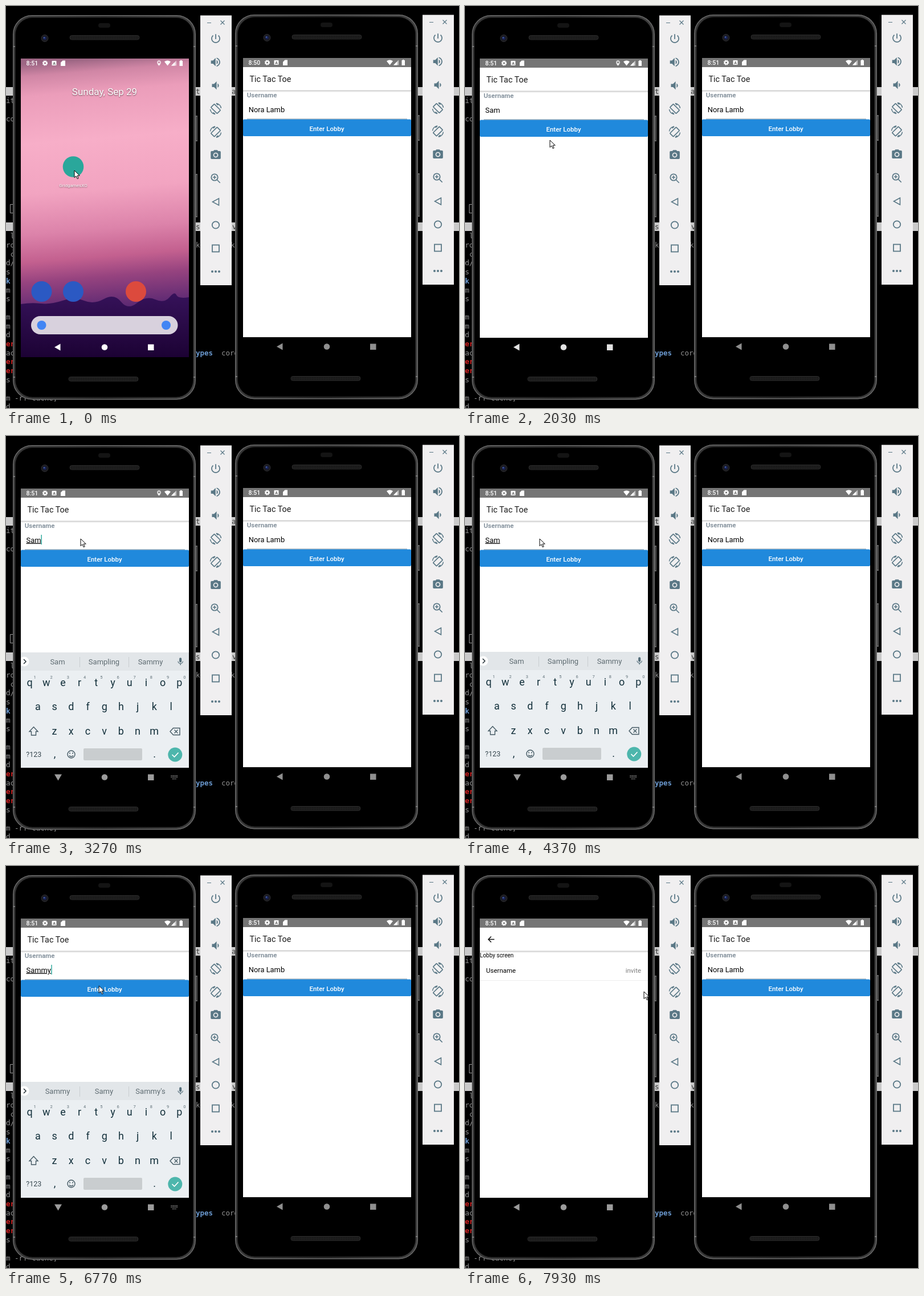
These frames come from a looping animation (795x704 px, 8000 ms). An HTML page:

```html
<!DOCTYPE html>
<html lang="en">
<head>
<meta charset="utf-8">
<title>Two phones</title>
<style>
html, body { margin: 0; width: 100%; height: 100%; overflow: hidden; background: #000; }
svg { display: block; width: 795px; height: 704px; font-family: Roboto, sans-serif; }
.mono { font-family: "DejaVu Sans Mono", monospace; font-size: 12.5px; }
.mid { text-anchor: middle; }
.title { font-size: 14.35px; fill: #1a1a1a; }
.label { font-size: 11.5px; font-weight: 700; fill: #86939e; }
.field { font-size: 12.9px; }
.under { text-decoration: underline; }
.button { font-size: 11.5px; font-weight: 500; fill: #fff; }
.clock { font-size: 10.5px; font-weight: 500; fill: #fff; }
.key { font-size: 18px; fill: #13303b; }
.hint { font-size: 7.5px; fill: #5f6f77; }
.tip { font-size: 13px; fill: #5f6c72; }
.shade { text-shadow: 0 1px 2px rgba(0, 0, 0, .55); }

.move { animation: 8s linear infinite; }
#cursor { animation-name: cursor; }
#keyboard { animation-name: keyboard; }
#nav { animation-name: nav; }
#ripple { animation-name: ripple; transform-origin: 173px 214.5px; }
#lobby { animation-name: lobby; }

@keyframes cursor {
  0%, 25.37% { transform: translate(120px, 288px); }
  25.375%, 25.875% { transform: translate(149px, 235px); }
  32.875%, 81.625% { transform: translate(131px, 180px); }
  85.375%, 94.125% { transform: translate(171px, 217px); }
  96.25%, 97.5% { transform: translate(234px, 224px); }
  99.125%, 100% { transform: translate(314px, 220px); }
}
@keyframes keyboard {
  0%, 38.375% { opacity: 0; transform: translateY(20px); animation-timing-function: ease-out; }
  40.875%, 42.125% { opacity: 1; transform: translateY(1px); }
  43.375%, 94.9% { opacity: 1; transform: none; }
  95.5%, 97.5% { opacity: 1; transform: translateY(1px); }
  98.9%, 100% { opacity: 0; transform: translateY(20px); }
}
@keyframes nav {
  0%, 25.37% { fill: #fff; }
  25.375%, 25.875% { fill: #e2e2e2; }
  32.875%, 100% { fill: #9c9c9c; }
}
@keyframes ripple {
  0%, 94.9% { opacity: 0; transform: scale(.4); }
  95% { opacity: 1; transform: scale(.5); }
  96.25%, 97.5% { opacity: 1; transform: none; }
  100% { opacity: 1; transform: scale(1.7); }
}
@keyframes lobby {
  0%, 97.5% { opacity: 0; transform: translateY(14px); animation-timing-function: ease-out; }
  99.125%, 100% { opacity: 1; transform: none; }
}
</style>
</head>
<body>
<svg viewBox="0 0 795 704">
  <defs>
    <linearGradient id="sky" gradientUnits="userSpaceOnUse" x1="150" y1="92" x2="185" y2="530">
      <stop offset="0" stop-color="#9d6684"/>
      <stop offset=".05" stop-color="#d086a5"/>
      <stop offset=".13" stop-color="#eb9dba"/>
      <stop offset=".32" stop-color="#f7aec8"/>
      <stop offset=".52" stop-color="#f2a4c1"/>
      <stop offset=".68" stop-color="#dc83aa"/>
      <stop offset=".79" stop-color="#c3608f"/>
      <stop offset=".87" stop-color="#96437f"/>
      <stop offset="1" stop-color="#5a2872"/>
    </linearGradient>
    <linearGradient id="hill" x1="0" y1="0" x2="0" y2="1">
      <stop offset="0" stop-color="#36125a"/>
      <stop offset="1" stop-color="#1c0234"/>
    </linearGradient>
    <linearGradient id="rim" x1="0" y1="0" x2="1" y2="0">
      <stop offset="0" stop-color="#383838"/>
      <stop offset=".5" stop-color="#262626"/>
      <stop offset="1" stop-color="#404040"/>
    </linearGradient>
    <pattern id="mesh" width="3" height="3" patternUnits="userSpaceOnUse">
      <rect width="3" height="3" fill="#202020"/>
      <rect width="1.5" height="1.5" fill="#101010"/>
    </pattern>
    <clipPath id="screen"><rect x="26" y="92" width="295" height="489"/></clipPath>
    <clipPath id="press"><rect x="26" y="199.5" width="295" height="29.5" rx="2"/></clipPath>

    <g id="turn" fill="none" stroke="#5a7886" stroke-width="1.7">
      <rect x="-4.2" y="-7.7" width="8.4" height="15.4" rx="1" transform="rotate(-45)"/>
      <path d="M1-9.5A9.5 9.5 0 0 1 9.5-1M-1 9.5A9.5 9.5 0 0 1-9.5 1" stroke-width="1.5"/>
      <path d="M1-9.5l3.5 3M-1 9.5l-3.5-3"/>
    </g>

    <g id="device">
      <rect x="331" y="192" width="5" height="45" fill="#666"/>
      <rect x="331" y="294" width="5" height="76" fill="#666"/>
      <rect x="334" y="194" width="1" height="41" fill="#222"/>
      <rect x="334" y="296" width="1" height="72" fill="#222"/>
      <rect x="12.7" y="16.7" width="319.6" height="672" rx="33" fill="url(#rim)" stroke="#6c6c6c" stroke-width="1.4"/>
      <rect x="16.5" y="20.5" width="312" height="664.5" rx="30" stroke="#161616"/>
      <path d="M12 71h4M329 71h4M12 650h4M329 650h4" stroke="#777" stroke-width="2"/>
      <rect x="162" y="30" width="21" height="8" rx="4" fill="#141414"/>
      <rect x="112" y="51.5" width="122" height="7.5" rx="3.5" fill="url(#mesh)" stroke="#292929"/>
      <rect x="110" y="649.5" width="122" height="7.5" rx="3.5" fill="url(#mesh)" stroke="#292929"/>
      <circle cx="68" cy="56.5" r="6" fill="#1b1b20" stroke="#2e2e32"/>
      <circle cx="68" cy="56.5" r="3" fill="#172050"/>
      <circle cx="67" cy="55.5" r="1.3" fill="#4561a8"/>

      <rect x="341" y="16.5" width="55" height="472.5" fill="#f0eff0"/>
      <g fill="none" stroke="#5a7886" stroke-width="1.8">
        <path d="M353 29.500h7M376.500 25.500l7 7m0-7l-7 7" stroke-width="1.2"/>
        <circle cx="366" cy="300" r="5.700"/>
        <path d="M370.200 304.200l5.500 5.500M363 300h6M366 297v6" stroke-width="1.600"/>
        <path d="M373.500 337v12l-11-6z" stroke-width="1.600"/>
        <circle cx="368" cy="383.500" r="6.200"/>
        <rect x="362" y="418.500" width="12" height="12"/>
      </g>
      <use href="#turn" x="368" y="180"/>
      <use href="#turn" transform="translate(368 220.500) scale(-1 1)"/>
      <g fill="#5a7886">
        <path transform="translate(357.500 46.500) scale(.88)" d="M13 3h-2v10h2V3zm4.830 2.170l-1.420 1.420C17.990 7.860 19 9.810 19 12c0 3.870-3.130 7-7 7s-7-3.130-7-7c0-2.190 1.010-4.140 2.580-5.420L6.170 5.170C4.230 6.820 3 9.260 3 12c0 4.970 4.030 9 9 9s9-4.030 9-9c0-2.740-1.230-5.180-3.170-6.830z"/>
        <path transform="translate(357 87.500) scale(.9)" d="M3 9v6h4l5 5V4L7 9H3zm13.500 3c0-1.770-1.020-3.290-2.500-4.030v8.050c1.480-.73 2.500-2.250 2.500-4.020zM14 3.230v2.060c2.890.86 5 3.540 5 6.710s-2.110 5.850-5 6.710v2.060c4.010-.91 7-4.490 7-8.770s-2.990-7.860-7-8.770z"/>
        <path transform="translate(357 128.500) scale(.9)" d="M18.500 12c0-1.770-1.020-3.290-2.500-4.030v8.050c1.480-.73 2.500-2.250 2.500-4.020zM5 9v6h4l5 5V4L9 9H5z"/>
        <path transform="translate(357.500 250.500) scale(.88)" d="M9 2L7.170 4H4c-1.100 0-2 .9-2 2v12c0 1.100.9 2 2 2h16c1.100 0 2-.9 2-2V6c0-1.100-.9-2-2-2h-3.170L15 2H9zm3 15c-2.760 0-5-2.240-5-5s2.240-5 5-5 5 2.240 5 5-2.240 5-5 5z"/>
        <circle cx="368" cy="261" r="2.700"/>
        <circle cx="362" cy="465" r="2"/><circle cx="368" cy="465" r="2"/><circle cx="374" cy="465" r="2"/>
      </g>
    </g>

    <g id="form">
      <rect x="26" y="92" width="295" height="489" fill="#fff"/>
      <rect x="26" y="92" width="295" height="16" fill="#757575"/>
      <path d="M26 149.500h295" stroke="#cfcfcf" stroke-width="2"/>
      <path d="M26 151.200h295" stroke="#eee"/>
      <text class="title" x="37.500" y="134">Tic Tac Toe</text>
      <text class="label" x="32.800" y="161">Username</text>
      <path d="M33 199h281" stroke="#6f7f8a"/>
      <rect x="26" y="199.500" width="295" height="29.500" rx="2" fill="#2089dc"/>
    </g>
    <text id="enter" class="button mid" x="173" y="219.500">Enter Lobby</text>

    <g id="status" fill="#fff">
      <circle cx="68.500" cy="100" r="2.600" fill="none" stroke="#fff" stroke-width="2"/>
      <circle cx="68.500" cy="100" r="4" fill="none" stroke="#fff" stroke-width="1.300" stroke-dasharray="2 1.140"/>
      <rect x="80.500" y="96" width="8" height="8" rx="1"/>
      <text x="84.500" y="102.700" class="mid" font-size="7" font-weight="700" fill="#666">A</text>
      <path d="M99.500 95.500h4.500v9.500h-8v-6z"/>
      <path d="M278 97.500q5.500-4 11 0l-5.500 7z"/>
      <path d="M299 95.500v9h-9z" opacity=".6"/>
      <path d="M296 98.500v6h-6z"/>
      <path d="M304.500 96h1.500v-1h2.500v1h1.500v9h-5.500z"/>
    </g>
    <g id="dots">
      <circle cx="173" cy="597.500" r="5.300"/>
      <rect x="249" y="592.500" width="10.500" height="10.500"/>
    </g>
    <path id="back" d="M95.500 591.500v12l-10.500-6z"/>
  </defs>

  <rect width="795" height="704"/>
  <g fill="#cacaca">
    <rect y="142" width="795" height="15"/>
    <rect y="379" width="795" height="15"/>
  </g>
  <path d="M12 347.500H7.500v15H12" fill="none" stroke="#999"/>
  <g id="shell" class="mono"></g>

  <use href="#device"/>
  <use href="#device" x="390" y="-1"/>

  <g transform="translate(390 -1)">
    <use href="#form"/>
    <use href="#enter"/>
    <use href="#status"/>
    <text class="field" x="35.800" y="186.500">Nora Lamb</text>
    <text class="clock" x="35.500" y="104" data-on="0 400">8:50</text>
    <text class="clock" x="35.500" y="104" data-on="400">8:51</text>
    <g fill="#8f8f8f"><use href="#back"/><use href="#dots"/></g>
  </g>

  <use href="#form"/>
  <g clip-path="url(#press)"><circle id="ripple" class="move" cx="173" cy="214.500" r="88" fill="#1b72b8"/></g>
  <use href="#enter"/>
  <text class="field" x="35.500" y="186.500" data-on="2030 2970">Sam</text>
  <text class="field under" x="35.500" y="186.500" data-on="2970 5000">Sam</text>
  <text class="field under" x="35.500" y="186.500" data-on="5000 5270">Samm</text>
  <text class="field under" x="35.500" y="186.500" data-on="5270">Sammy</text>
  <g fill="#26a69a">
    <rect x="61.500" y="173" width="1.400" height="17" data-on="2970 3900 4530 5000"/>
    <rect x="73.200" y="173" width="1.400" height="17" data-on="5000 5270"/>
    <rect x="79.300" y="173" width="1.400" height="17" data-on="5270 6170 6730 7300"/>
  </g>

  <g clip-path="url(#screen)">
    <g id="lobby" class="move">
      <rect x="26" y="108" width="295" height="493" fill="#fff"/>
      <path d="M26 149.500h295" stroke="#cfcfcf" stroke-width="2"/>
      <path d="M26 151.200h295M26 200.500h295" stroke="#eee"/>
      <path d="M51.500 128.500H41m5-5l-5 5 5 5" fill="none" stroke="#111" stroke-width="1.500"/>
      <text x="26" y="160" font-size="10">Lobby screen</text>
      <text x="37" y="186.500" font-size="11.500">Username</text>
      <text x="309" y="186.500" font-size="11.500" text-anchor="end" fill="#7d7d7d">invite</text>
    </g>
    <g id="keyboard" class="move">
      <rect x="26" y="378" width="295" height="203" fill="#ebeff2"/>
      <rect x="26" y="378" width="295" height="32" fill="#e2e6e9"/>
      <path d="M129.500 386v18M215.500 386v18" stroke="#c9ced1"/>
      <circle cx="32" cy="394" r="8.500" fill="#fff"/>
      <path d="M31 390l4 4-4 4" fill="none" stroke="#263238" stroke-width="1.500"/>
      <path transform="translate(298 386) scale(.68)" fill="#546e7a" d="M12 14c1.660 0 3-1.340 3-3V5c0-1.660-1.340-3-3-3S9 3.340 9 5v6c0 1.660 1.340 3 3 3zm5.300-3c0 3-2.540 5.100-5.300 5.100S6.700 14 6.700 11H5c0 3.410 2.720 6.230 6 6.720V21h2v-3.280c3.280-.48 6-3.300 6-6.720h-1.700z"/>
      <g class="tip mid">
        <text x="90.500" y="399" data-on="2970 5000">Sam</text>
        <text x="90.500" y="399" data-on="5000 5370">Samm</text>
        <text x="90.500" y="399" data-on="5370">Sammy</text>
        <text x="172" y="399" data-on="2970 5370">Sampling</text>
        <text x="172" y="399" data-on="5370">Samy</text>
        <text x="253.500" y="399" data-on="2970 5370">Sammy</text>
        <text x="253.500" y="399" data-on="5370">Sammy's</text>
      </g>
      <g id="keys" class="mid"></g>
      <g fill="none" stroke="#455a64" stroke-width="1.400">
        <path d="M48.500 508.500l7.500 8h-3.500v6.500h-8v-6.500H41z"/>
        <path d="M293.500 510.500H305v12h-11.500l-5.500-6zM295.500 513.500l6 6m0-6l-6 6"/>
        <circle cx="114.500" cy="556.500" r="6.500"/>
        <path d="M111 558.500q3.500 4 7 0"/>
        <path d="M112 553.500v2M117 553.500v2" stroke-width="1.700"/>
      </g>
      <text class="mid" x="48.800" y="561" font-size="12.500" fill="#37474f">?123</text>
      <text class="key mid" x="85.500" y="562">,</text>
      <text class="key mid" x="260.500" y="562">.</text>
      <rect x="136" y="546" width="103" height="21" rx="2" fill="#c9cdcf"/>
      <circle cx="296.800" cy="557" r="12.500" fill="#4db6ac"/>
      <path d="M291.500 557l4 4 7-7.500" fill="none" stroke="#fff" stroke-width="1.700"/>
    </g>
  </g>

  <g data-on="0 2030">
    <rect x="26" y="92" width="295" height="523" fill="url(#sky)"/>
    <path d="M26 522q18-3 35-1t38-5 38 0 35-3 30 5 28 2 32-6 25-4 12-4 22 4V615H26z" fill="url(#hill)"/>
    <text class="mid shade" x="173" y="156" font-size="17" fill="#fff">Sunday, Sep 29</text>
    <circle cx="118" cy="281.500" r="18.300" fill="#2aa79b"/>
    <text class="mid shade" x="118" y="316.500" font-size="8" fill="#fff">GridgamesXO</text>
    <g fill="#2b59c3"><circle cx="62.500" cy="500" r="18"/><circle cx="118" cy="500" r="18"/></g>
    <circle cx="228" cy="500" r="18" fill="#dc4a3d"/>
    <rect x="44" y="543" width="257.500" height="32" rx="16" fill="#d8d1dd"/>
    <g fill="#4285f4"><circle cx="62.500" cy="559" r="8"/><circle cx="281" cy="559" r="8"/></g>
  </g>

  <use href="#status"/>
  <text class="clock" x="35.500" y="104">8:51</text>
  <path data-on="0 4370" transform="translate(263 94.500) scale(.46)" fill="#fff" d="M12 2C8.130 2 5 5.130 5 9c0 5.250 7 13 7 13s7-7.750 7-13c0-3.870-3.130-7-7-7zm0 11a4 4 0 1 1 0-8 4 4 0 0 1 0 8z"/>
  <g id="nav" class="move">
    <use href="#dots"/>
    <use href="#back" data-on="0 3070 7850"/>
    <g data-on="3070 7850">
      <path d="M85 592.500h13l-6.500 11z"/>
      <path d="M289.500 595h12M289.500 597.500h12M292 600.500h7" fill="none" stroke="#8c8c8c" stroke-width="1.600" stroke-dasharray="1.500 1"/>
    </g>
  </g>
  <path id="cursor" class="move" d="M0 0V12.500L3 9.800 5.200 14.600 7.200 13.700 5.100 9H9.300z" fill="#fff" stroke="#000"/>
</svg>
<script>
const LOOP = 8000;
const find = id => document.getElementById(id);
const text = (x, y, s, attrs = '') => `<text x="${x}" y="${y}" ${attrs}>${s}</text>`;

// Terminal behind the phones: [row centre, text, colour, x]
const GREY = '#929292', BLUE = '#6c9bd2', RED = '#d02020', DARK = '#333';
const lines = [
  [166, 'it'], [198, 'co'], [403, '&#160;l'], [419, 'ro'], [435, '&#160;c'], [450, 'd/'],
  [466, 's'], [482, 'k', BLUE], [498, 'm'], [513, 's'], [545, 'm'], [561, 'm'], [576, 'd'],
  [592, 'er', RED], [608, 'ac'], [623, 'er', RED], [639, 'er', RED], [655, 's'],
  [687, 'm -rf cache,'], [702, 'd'],
  [150, 'to', DARK, 333], [150, 'a', DARK, 396], [387, 's', DARK, 333], [387, 'v', DARK, 397],
  [419, 'k', GREY, 333], [419, 'k', GREY, 394], [608, 'ypes', BLUE, 333], [608, 'cord', GREY, 378]
];
find('shell').innerHTML = lines.map(([y, s, color = GREY, x = 0]) =>
  text(x, y + 4, s, `fill="${color}" font-weight="${color === BLUE || color === RED ? 700 : 400}"`)).join('');

const rows = [['qwertyuiop', 41.5, 437], ['asdfghjkl', 56, 479], ['zxcvbnm', 85, 521.5]];
find('keys').innerHTML = rows.map(([keys, x0, y], row) => [...keys].map((key, i) => {
  const x = x0 + i * 29.2;
  return text(x, y, key, 'class="key"') + (row ? '' : text(x + 9, y - 13.5, (i + 1) % 10, 'class="hint"'));
}).join('')).join('');

// data-on lists the times at which a part turns on, off, on, ...
for (const el of document.querySelectorAll('[data-on]')) {
  const times = el.dataset.on.split(' ').map(Number);
  const frames = times.map((t, i) => ({ offset: t / LOOP, opacity: 1 - i % 2, easing: 'step-end' }));
  if (times[0] > 0) frames.unshift({ offset: 0, opacity: 0, easing: 'step-end' });
  frames.push({ offset: 1, opacity: times.length % 2 });
  el.animate(frames, { duration: LOOP, iterations: Infinity });
}
</script>
</body>
</html>
```
